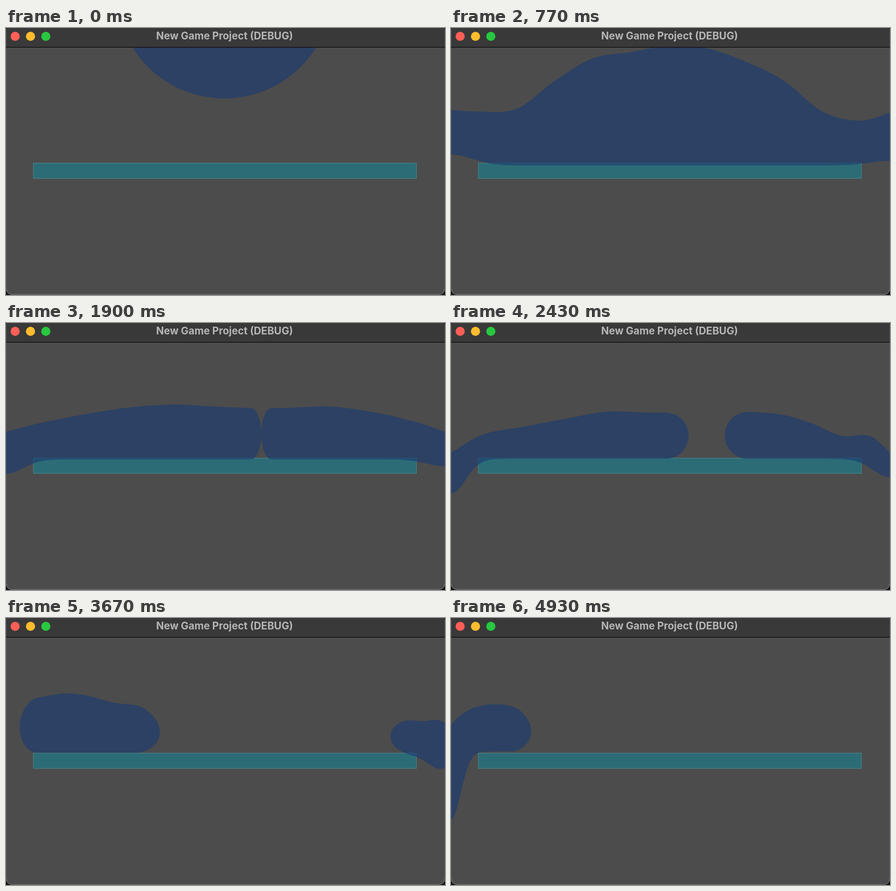
These frames come from a looping animation (959 by 584 pixels, 4970 ms). An HTML page:

```html
<!DOCTYPE html>
<html lang="en">
<head>
<meta charset="utf-8">
<title>Fluid drop</title>
<style>
  html, body { margin: 0; width: 100%; height: 100%; overflow: hidden; background: #101413; }
  svg { display: block; width: 959px; height: 584px; }
  text { font: 700 22.25px Inter, "Liberation Sans", sans-serif; fill: #b5b5b5; text-anchor: middle; }
</style>
</head>
<body>
<svg viewBox="0 0 959 584">
  <defs>
    <clipPath id="window"><rect y="-6" width="959" height="589.5" rx="13"/></clipPath>
    <clipPath id="view"><rect y="43" width="959" height="541"/></clipPath>
  </defs>
  <g clip-path="url(#window)">
    <rect width="959" height="584" fill="#4c4c4c"/>
    <rect width="959" height="42" fill="#393939"/>
    <rect y="41.5" width="959" height="1.4" fill="#0c0c0c"/>
    <rect x="59.7" y="295.5" width="837" height="33.5" fill="#2c6c77" stroke="#4f8a90"/>
    <path id="fluid" fill="rgb(29,60,112)" fill-opacity=".65" clip-path="url(#view)"/>
  </g>
  <rect x=".5" y="-6" width="958" height="589" rx="12.5" fill="none" stroke="#8c8c8c" stroke-opacity=".25"/>
  <path d="M1 571Q2 583 14 583H945Q957 583 958 571" fill="none" stroke="#858585"/>
  <circle cx="20" cy="18.2" r="10" fill="#ff5f57"/>
  <circle cx="53.5" cy="18.2" r="10" fill="#febc2e"/>
  <circle cx="87" cy="18.2" r="10" fill="#28c840"/>
  <text x="477.5" y="25">New Game Project (DEBUG)</text>
</svg>
<script>
const LOOP = 4970, STEP = 100 / 3, WIDTH = 959, MID = 477, KNOTS = 7, SAMPLES = 120;
const left = [], right = [];
const flat = y => Array(KNOTS).fill(y);
const mix = (a, b, k) => a + (b - a) * k;

// ends: left x, right x and the length of each rounded cap.
// sag: how far the fluid hangs at the window edge. top: evenly spaced surface heights.
function pose(part, t, ends, sag, top) {
  part.push({ t, values: [...ends, sag, ...top] });
}
function mirrored(t, x, cap, top) {
  pose(left, t, [x, MID, cap, 0], 0, top);
  pose(right, t, [MID, 2 * MID - x, 0, cap], 0, [...top].reverse());
}

// Fall and impact
mirrored(0, 241, 236, flat(-318));
mirrored(200, 235, 240, flat(-172));
mirrored(370, 130, 60, [150, 135, 40, -45, -80, -95, -100]);
mirrored(530, 24, 60, [170, 160, 140, 65, 0, -40, -50]);

// Mound, then an even layer that necks and breaks
pose(left, 770, [-23, MID, 0, 0], -24, [178, 183, 177, 116, 67, 54, 38]);
pose(left, 1370, [-23, 557, 0, 0], -10, [187, 189, 175, 169, 165, 176, 170]);
pose(left, 2200, [-23, 558, 0, 35], 55, [272, 236, 214, 194, 186, 187, 196]);
pose(right, 770, [MID, 981, 0, 0], -10, [38, 46, 75, 117, 184, 203, 180]);
pose(right, 1370, [557, 981, 0, 0], -2, [170, 180, 176, 176, 179, 187, 198]);
pose(right, 2200, [558, 981, 35, 0], 25, [196, 188, 186, 197, 216, 240, 270]);

// Two pieces pull together, then slide off
pose(left, 2433, [-23, 519, 0, 50], 76, [293, 245, 227, 210, 194, 196, 196]);
pose(left, 2800, [-10, 448, 15, 60], 82, [262, 200, 172, 180, 190, 192, 200]);
pose(left, 3167, [105, 384, 75, 55], 0, [165, 152, 147, 165, 190, 193, 205]);
pose(left, 4167, [-45, 288, 0, 46], 0, [200, 192, 183, 177, 180, 189, 203]);
pose(left, 4933, [-23, 175, 0, 45], 149, [262, 222, 199, 190, 189, 195, 203]);
pose(right, 2433, [598, 981, 50, 0], 40, [195, 195, 201, 220, 247, 248, 300]);
pose(right, 3167, [729, 929, 50, 60], 0, [188, 188, 190, 193, 187, 187, 190]);
pose(right, 4167, [951, 1040, 40, 40], 78, flat(258));
pose(right, 4933, [1060, 1150, 40, 40], 78, flat(258));

function valuesAt(part, t) {
  const i = part.findIndex(p => p.t > t);
  if (i < 0) return part.at(-1).values;
  const a = part[i - 1], b = part[i], k = (t - a.t) / (b.t - a.t);
  return a.values.map((v, j) => mix(v, b.values[j], k));
}

// Smooth curve through evenly spaced heights, u from 0 to 1
function surface(h, u) {
  const s = u * (h.length - 1), i = Math.min(Math.floor(s), h.length - 2), f = s - i;
  const b = h[i], c = h[i + 1], a = h[i - 1] ?? b, d = h[i + 2] ?? c;
  return b + f / 2 * (c - a + f * (2 * a - 5 * b + 4 * c - d + f * (3 * (b - c) + d - a)));
}

const round = (dist, cap) => dist < cap ? Math.sqrt(1 - (1 - dist / cap) ** 2) : 1;

// Lowest level: free fall, then resting on the bar
const floorAt = s => Math.min(154 + 620 * s + 408 * s * s, 302 - 2 * s);

function outline(part, t) {
  const [x0, x1, cap0, cap1, sag, ...top] = valuesAt(part, t);
  const floor = floorAt(t / 1000), upper = [], lower = [];
  for (let i = 0; i <= SAMPLES; i++) {
    const u = (1 - Math.cos(Math.PI * i / SAMPLES)) / 2, x = mix(x0, x1, u);
    const edge = Math.max(0, Math.min(x, WIDTH - x));
    const bottom = floor + sag * Math.exp(-((edge / (60 - sag / 5)) ** 2));
    const y = surface(top, u), middle = (y + bottom) / 2;
    const half = (bottom - y) / 2 * round(x - x0, cap0) * round(x1 - x, cap1);
    upper.push(`${x.toFixed(1)} ${(middle - half).toFixed(1)}`);
    lower.unshift(`${x.toFixed(1)} ${(middle + half).toFixed(1)}`);
  }
  return `M${[...upper, ...lower].join("L")}Z`;
}

const fluid = document.getElementById("fluid"), start = performance.now();
function tick() {
  const elapsed = Math.max(0, performance.now() - start) % LOOP;
  const t = Math.floor((elapsed + 3.4) / STEP) * STEP;
  fluid.setAttribute("d", outline(left, t) + outline(right, t));
  requestAnimationFrame(tick);
}
tick();
</script>
</body>
</html>
```
